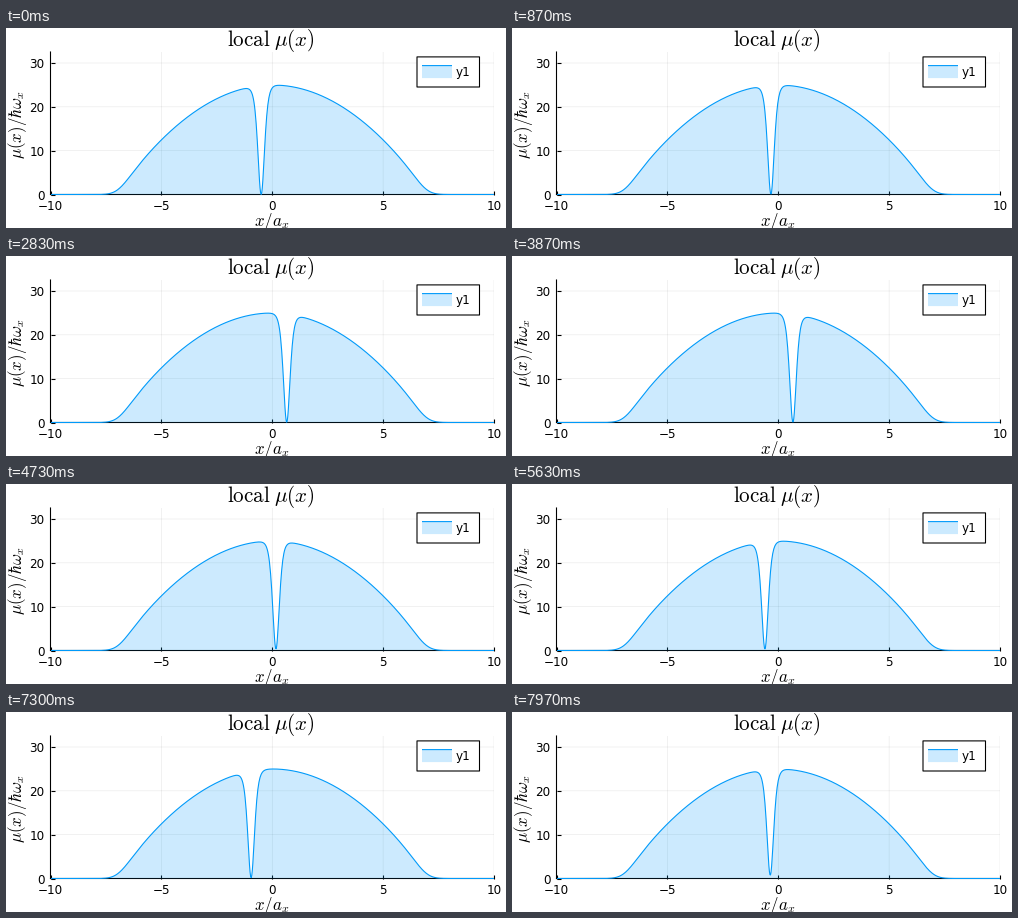
Recreate the animation shown at these times as a matplotlib script. Size 500x200 px, loop 8000 ms.

```python
import numpy as np
import matplotlib.pyplot as plt
from matplotlib.animation import FuncAnimation
from matplotlib.patches import Rectangle

W, H, DPI = 500, 200, 100
LOOP, FRAMES = 8000, 240
PX = 72 / DPI                      # points per pixel
BLUE = "#009afa"
LEFT, RIGHT, TOP, BOTTOM = 44.5, 488.0, 24.0, 166.5
MU = 25.0                          # chemical potential

# Dark soliton in the trap: an oscillation that grows slowly
HALF_PERIOD = 3360                 # ms
GROWTH = np.log(1.5) / np.pi       # per radian
START = -0.5

plt.rcParams.update({
    "font.family": "DejaVu Sans",
    "font.size": 12 * PX,
    "mathtext.fontset": "cm",
    "path.snap": False,
})


def ground_state(x):
    """Amplitude of the condensate at rest, by Newton's method."""
    h = x[1] - x[0]
    trap = x**2 / 2
    n = len(x)
    lap = (np.eye(n, k=1) - 2 * np.eye(n) + np.eye(n, k=-1)) / h**2
    psi = np.sqrt(1.13 * np.logaddexp(0, (MU - trap) / 1.13))
    for _ in range(10):
        res = -lap @ psi / 2 + (trap + psi**2 - MU) * psi
        jac = -lap / 2 + np.diag(trap + 3 * psi**2 - MU)
        psi = psi - np.linalg.solve(jac, res)
    return psi


x = np.linspace(-10, 10, 801)
rest = ground_state(x) ** 2


def local_mu(ms):
    a = np.pi * ms / HALF_PERIOD
    swing = START * np.exp(GROWTH * a)
    pos = swing * (np.cos(a) - GROWTH * np.sin(a))
    vel = -swing * (1 + GROWTH**2) * np.sin(a) / np.sqrt(2)
    peak = MU - pos**2 / 2
    grey = vel**2 / peak
    width = np.sqrt(peak - vel**2)
    return rest * (grey + (1 - grey) * np.tanh(width * (x - pos)) ** 2)


fig = plt.figure(figsize=(W / DPI, H / DPI), dpi=DPI, facecolor="white")

ax = fig.add_axes([LEFT / W, 1 - BOTTOM / H, (RIGHT - LEFT) / W, (BOTTOM - TOP) / H])
ax.set_xlim(-10, 10)
ax.set_ylim(0, (BOTTOM - TOP) / 4.383)
ax.set_xticks(range(-10, 11, 5))
ax.set_yticks(range(0, 31, 10))
ax.set_axisbelow(True)
ax.grid(color="black", alpha=0.1, lw=0.55 * PX)
ax.tick_params(direction="in", length=4 * PX, width=1.1 * PX)
ax.tick_params(axis="x", pad=5.3 * PX)
ax.tick_params(axis="y", pad=6 * PX)
for side in ("top", "right"):
    ax.spines[side].set_visible(False)
for side in ("left", "bottom"):
    ax.spines[side].set(linewidth=1.1 * PX, zorder=1)

area, = ax.fill([0, 0, 0], [0, 0, 0], color=BLUE, alpha=0.2, lw=0, zorder=2)
curve, = ax.plot([], [], color=BLUE, lw=1.1 * PX, zorder=3)

# Overlay in pixel coordinates, y downwards
page = fig.add_axes([0, 0, 1, 1], zorder=2)
page.set_xlim(0, W)
page.set_ylim(H, 0)
page.axis("off")


def label(px, py, text, size, **kw):
    page.text(px, py, text, fontsize=size * PX, va="baseline", **kw)


mid = (LEFT + RIGHT) / 2
label(mid - 1.5, 18, r"$\mathrm{local}\;\mu(x)$", 21, ha="center")
label(mid - 0.5, 198, r"$x/a_x$", 17, ha="center")
label(16, 97, r"$\mu(x)/\hbar\omega_x$", 17, ha="center",
      rotation=90, rotation_mode="anchor")

page.add_patch(Rectangle((411, 28.9), 62.5, 30.1, fc="white", ec="black",
                         lw=1.1 * PX, joinstyle="round"))
page.add_patch(Rectangle((416, 37.6), 30, 12.5, fc=BLUE, alpha=0.2, lw=0))
page.plot([416, 446], [37.6, 37.6], color=BLUE, lw=1.1 * PX, solid_capstyle="butt")
label(449.8, 48.2, "y1", 12)


def draw(i):
    y = local_mu(i * LOOP / FRAMES)
    curve.set_data(x, y)
    area.set_xy(np.column_stack([np.r_[x, 10, -10], np.r_[y, 0, 0]]))
    return curve, area


anim = FuncAnimation(fig, draw, frames=FRAMES, interval=LOOP / FRAMES,
                     init_func=lambda: draw(0), repeat=True, repeat_delay=0)
plt.show()
```
